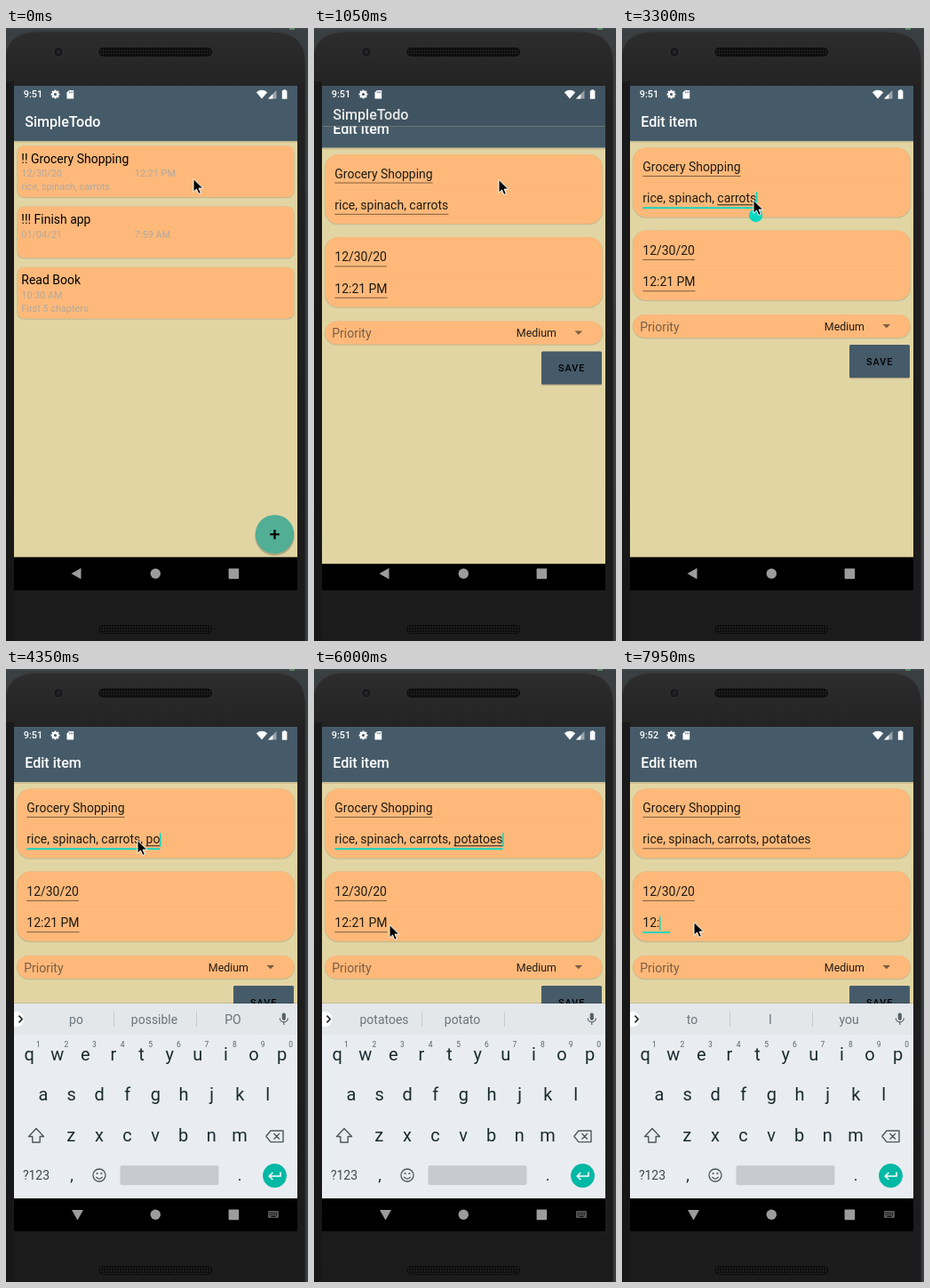
These frames come from a looping animation (340x689 px, 8 s). An HTML page:

```html
<!DOCTYPE html>
<html lang="en">
<head>
<meta charset="utf-8">
<title>Todo app</title>
<style>
  html, body { margin: 0; width: 100%; height: 100%; overflow: hidden; background: #111; }
  svg { display: block; width: 340px; height: 689px; }
  text { font-family: Roboto, sans-serif; white-space: pre; }
</style>
</head>
<body>
<svg id="stage" viewBox="0 0 340 689" xmlns="http://www.w3.org/2000/svg"></svg>
<script>
const LOOP = 8000, TICK = 150;
const SLATE = '#465b69', SAND = '#e2d5a4', PEACH = '#feb97a', TEAL = '#05d8c2';
const BODY = 13.97, SMALL = 10.87;

const pen = document.createElement('canvas').getContext('2d');
pen.font = `${BODY}px Roboto, sans-serif`;
const widthOf = s => pen.measureText(s).width;

// Markup helpers
const text = (s, x, y, size, fill = '#000', more = '') =>
  `<text x="${x}" y="${y}" font-size="${size}" fill="${fill}" ${more}>${s}</text>`;
const rect = (x, y, w, h, fill, r = 0, more = '') =>
  `<rect x="${x}" y="${y}" width="${w}" height="${h}" rx="${r}" fill="${fill}" ${more}/>`;
const path = (d, fill, more = '') => `<path d="${d}" fill="${fill}" ${more}/>`;
const circle = (x, y, r, fill, more = '') => `<circle cx="${x}" cy="${y}" r="${r}" fill="${fill}" ${more}/>`;
const line = (d, color, w = 1, more = '') => path(d, 'none', `stroke="${color}" stroke-width="${w}" ${more}`);
const MID = 'text-anchor="middle"', BOLD = 'font-weight="500"';

const card = (x, y, w, h, r) =>
  rect(x, y + .6, w, h, '#000', r, 'opacity=".12" stroke="#000" stroke-width="1.4"') + rect(x, y, w, h, PEACH, r);

function page(title, content) {
  return rect(9, 65, 319, 529.7, SAND) + content +
    rect(9, 127, 319, 2, '#000', 0, 'opacity=".1"') +
    rect(9, 65, 319, 62, SLATE) + text(title, 21.2, 111.4, 16.1, '#fff', BOLD);
}

function todo(y, title, date, time, note) {
  const gray = '#b1a89f';
  return card(13, y, 311, 57.5, 7) + text(title, 17.3, y + 19.2, BODY) +
    text(date, 17.3, y + 34.9, SMALL, gray) + text(time, 144.8, y + 34.9, SMALL, gray) +
    text(note, 17.3, y + 49.8, SMALL, gray);
}

function listPage() {
  return page('SimpleTodo',
    todo(132.5, '!! Grocery Shopping', '12/30/20', '12:21 PM', 'rice, spinach, carrots') +
    todo(200.7, '!!! Finish app', '01/04/21', '7:59 AM', '') +
    todo(268.9, 'Read Book', '10:30 AM', '', 'First 5 chapters') +
    circle(302.5, 571, 22.2, '#000', 'opacity=".2"') + circle(302.5, 569, 21.8, '#52ae94') +
    line('M297.3 569.2h10.4M302.5 564v10.4', '#000', 2.3));
}

const field = (id, y) =>
  `<g id="${id}"><text x="23.3" y="${y}" font-size="${BODY}" fill="#1f1a14"></text>` +
  rect(23.3, y + 5, 10, 1, '#000') + rect(0, y + 2, 0, 1, '#1f1a14') +
  rect(0, y - 12, 1.5, 15.5, TEAL) +
  `<path fill="${TEAL}" d="M0 0L5.6 3.2A7.6 7.6 0 1 1 -5.6 3.2Z"/></g>`;

function editPage() {
  const rule = y => rect(23, y, 292, 1, '#000', 0, 'opacity=".025"');
  return page('Edit item',
    card(12.5, 134.5, 312, 78, 15) + card(12.5, 227.5, 312, 78.5, 15) + card(12.5, 322, 312, 26, 13) +
    rule(173) + rule(267) +
    field('name', 161) + field('note', 196.3) + field('date', 254.9) + field('time', 290.2) +
    text('Priority', 20.3, 340.7, BODY, '#7a5d43') + text('Medium', 227.8, 339.5, 12.42, '#211a13') +
    path('M293.5 333h8.6l-4.3 4.3z', '#7a5d43') +
    rect(256, 357.2, 68, 37, '#000', 1.5, 'opacity=".22"') + rect(256, 356, 68, 37, SLATE, 1.5) +
    text('SAVE', 275, 378.8, SMALL, '#000', BOLD + ' letter-spacing=".97"'));
}

function phone() {
  return rect(0, 0, 340, 689, '#3a3f42') + rect(0, 0, 340, 1.5, '#40494d') + rect(319, 0, 6, 2, '#5d8a66') +
    path('M-2 700V40Q-2 4 36 4H300Q337.5 4 337.5 40V700Z', 'url(#shell)', 'stroke="#3b3b3b" stroke-width="1.5"') +
    rect(0, 60, 9, 629, '#141414', 0, 'opacity=".6"') +
    circle(59, 27, 5.5, '#1a1a1c', 'stroke="#353535"') + circle(59, 27, 2, '#26262b') +
    [22, 671].map(y => rect(104.5, y, 127.5, 10, '#0b0b0b', 5) + rect(105.5, y + 1, 125.5, 8, 'url(#mesh)', 4)).join('');
}

function statusBar() {
  let teeth = '';
  for (let i = 0; i < 8; i++) teeth += rect(54.4, 69.6, 2.2, 2.4, '#fff', 0, `transform="rotate(${i * 45} 55.5 74.5)"`);
  return text('9:51', 19.8, 78.4, SMALL, '#fff', BOLD + ' id="clock"') +
    teeth + circle(55.5, 74.5, 2.6, 'none', 'stroke="#fff" stroke-width="2"') +
    path('M71 70h5.2v9.5h-7.7v-7z', '#fff') +
    line('M71.3 71.3v2M73 71.3v2M74.7 71.3v2', SLATE, .8) +
    path('M281.8 72.2Q288 67.3 294.2 72.2L288 79.6Z', '#fff') +
    path('M304.5 70v9.5h-9.5z', '#fff', 'opacity=".45"') + path('M300.3 74.2v5.3H295z', '#fff') +
    path('M312.3 69.2h2.6v1.1h1.5v9.4h-5.6v-9.4h1.5z', '#fff');
}

function navBar() {
  const gray = '#9c9c9c';
  return path('M73.5 613.3L84.5 607v12.6z', gray, 'id="back"') +
    circle(168.3, 613.3, 5.7, gray) + rect(250.6, 607.6, 11.6, 11.6, gray, .8) +
    `<g id="ime">${path('M74 608h13l-6.5 11.5z', gray)}` +
    rect(295, 609, 12, 8, '#555', 1) +
    line('M296.5 611.3h9M296.5 613.3h9', '#000', 1, 'stroke-dasharray="1 .9"') +
    line('M298.5 615.4h5', '#000') + '</g>';
}

function keyboard() {
  const ink = '#1b2b32', soft = '#69757b', step = 31.6;
  const row = (keys, x, y) => [...keys].map((k, i) => text(k, x + i * step, y, 20, ink, MID)).join('');
  const digits = [...'1234567890'].map((d, i) => text(d, 36.3 + i * step, 425, 8.5, '#566167', MID)).join('');
  const icon = d => line(d, '#4b575d', 1.4, 'stroke-linejoin="round"');
  return rect(9, 375, 319, 1.5, '#000', 0, 'opacity=".12"') +
    rect(9, 376, 319, 219, '#e9edf1') + rect(9, 376, 319, 35, '#e3e7ea') +
    path('M9 385.5A8.5 8.5 0 1 1 9 401.5Z', '#fff') + line('M14.5 389.7l3.7 3.8-3.7 3.8', '#20292d', 1.7) +
    [79, 167, 255.5].map(x => text('', x, 398.6, BODY, soft, MID + ' class="hint"')).join('') +
    rect(121, 385, 1, 17, '#c5cace') + rect(214, 385, 1, 17, '#c5cace') +
    rect(310.7, 386.5, 4.2, 8.4, '#566167', 2.1) + line('M308.3 392.5a4.5 4.3 0 0 0 9 0M312.8 397v3', '#566167', 1.2) +
    row('qwertyuiop', 26.2, 440) + digits + row('asdfghjkl', 42, 485) + row('zxcvbnm', 73.3, 531) +
    icon('M34 516.5l8.5 9h-4.3v6.5h-8.4v-6.5h-4.3z') +
    icon('M292.8 525.3l5.2-6.3h14v12.6h-14zM301.5 522l6.5 6.6M308 522l-6.5 6.6') +
    text('?123', 34, 574, BODY, '#3c484e', MID) + text(',', 74, 575, 18, ink, MID) + text('.', 263, 575, 18, ink, MID) +
    circle(105, 569, 7, 'none', 'stroke="#4b575d" stroke-width="1.3"') +
    circle(102.6, 567, 1.1, '#4b575d') + circle(107.4, 567, 1.1, '#4b575d') + line('M101.3 570.8q3.7 4.5 7.4 0', '#4b575d', 1.3) +
    rect(128.5, 558, 111, 22, '#c7cbcf', 2) +
    circle(302.5, 569.5, 13.4, '#00b8a4') +
    line('M309 565.5v4.5h-12.5M300.3 566l-4 4 4 4', '#fff', 1.6);
}

const stage = document.getElementById('stage');
stage.innerHTML = `<defs>
  <linearGradient id="shell" x2="0" y2="1"><stop stop-color="#2d2d2d"/><stop offset=".1" stop-color="#222"/><stop offset="1" stop-color="#1b1b1b"/></linearGradient>
  <pattern id="mesh" width="3" height="3" patternUnits="userSpaceOnUse"><circle cx="1.5" cy="1.5" r=".9" fill="#292929"/></pattern>
  <clipPath id="screen"><rect x="9" y="65" width="319" height="567"/></clipPath>
  <clipPath id="reveal"><rect id="window" x="9" y="65" width="319" height="567"/></clipPath>
  </defs>${phone()}
  <g clip-path="url(#screen)">
    ${rect(9, 65, 319, 567, '#000')}
    <g id="list">${listPage()}</g>
    <g id="edit" clip-path="url(#reveal)"><g id="sheet">${editPage()}</g></g>
    <g id="keys">${keyboard()}</g>
    ${statusBar()}${navBar()}
  </g>
  <path id="mouse" d="M0 .5V15.3L3.5 12 5.8 17.4 8.4 16.3 6.1 11.1H10.8Z" fill="#000" stroke="#fff" stroke-width="1"/>`;

const $ = id => document.getElementById(id);
const set = (el, attrs) => { for (const k in attrs) el.setAttribute(k, attrs[k]); };
const show = (el, on) => { el.style.display = on ? '' : 'none'; };
const latest = (list, t) => list.reduce((v, e) => e[0] <= t ? e : v, list[0]);

// [time, x, y] of the pointer tip
const route = [
  [0, 211, 169], [900, 211, 169], [1050, 208, 170], [1200, 206, 171], [1800, 168, 188],
  [2400, 168, 188], [2850, 148, 193], [4200, 148, 193], [4350, 148, 192], [5100, 148, 192],
  [5550, 150, 295], [5700, 150, 295], [5850, 104, 303], [6000, 85, 287], [6300, 81, 284], [LOOP, 81, 284]
];
const noteTyping = [
  [0, 'rice, spinach, ', 'carrots'], [3900, 'rice, spinach, carrots,', ''], [4050, 'rice, spinach, carrots, ', ''],
  ...[[4350, 2], [4500, 4], [4650, 5], [4800, 6], [4950, 8]]
    .map(([t, n]) => [t, 'rice, spinach, carrots, ', 'potatoes'.slice(0, n)])
];
const hints = [
  [4350, 'po', 'possible', 'PO'], [4500, 'pota', 'potato', 'potatoes'], [4650, 'potat', 'potato', 'potatoes'],
  [4800, 'potato', 'potatoes', 'potato’s'], [4950, 'potatoes', 'potato', ''], [6900, 'to', 'I', 'you']
];

function pointer(t) {
  const i = Math.max(1, route.findIndex(p => p[0] >= t));
  const [a, b] = [route[i - 1], route[i]], k = (t - a[0]) / (b[0] - a[0]);
  return [a[1] + (b[1] - a[1]) * k, a[2] + (b[2] - a[2]) * k];
}

function drawField(id, value, { focus = false, composing = '', caret = false, handle = false } = {}) {
  const [label, under, mark, bar, drop] = $(id).children;
  const y = +label.getAttribute('y'), full = value + composing, end = 23.3 + widthOf(full);
  label.textContent = full;
  set(under, {
    y: y + 5, width: Math.max(31, end - 23.3), height: focus ? 1.8 : 1,
    fill: focus ? TEAL : '#000', opacity: focus ? 1 : .5
  });
  set(mark, { x: 23.3 + widthOf(value), width: widthOf(composing) });
  set(bar, { x: end - .4 });
  set(drop, { transform: `translate(${end - .7} ${y + 6})` });
  show(bar, caret);
  show(drop, handle);
}

function draw(t) {
  // Page opening: the new page slides up while its clip uncovers it from below
  const k = (t - 900) / TICK, rest = k < 4 ? .95 * .345 ** k : 0, opened = t >= 900;
  show($('list'), k < 4);
  show($('edit'), opened);
  set($('list'), { transform: `translate(0 ${opened ? -12 * (1 - rest) : 0})`, opacity: opened ? 1 - .12 * (1 - rest) : 1 });
  set($('sheet'), { transform: `translate(0 ${23 * rest})` });
  set($('window'), { y: 65 + 530 * Math.min(1, rest ** 2.2) });

  const inNote = t >= 2850 && t < 6450, inTime = t >= 6450;
  const [, value, part] = latest(noteTyping, t);
  const active = t >= 3150 && t < 6450;
  drawField('name', 'Grocery Shopping');
  drawField('note', active ? value : value + part, {
    focus: inNote, composing: active ? part : '',
    caret: active && !(t >= 5400 && t < 5850), handle: t >= 3150 && t < 3900
  });
  drawField('date', '12/30/20');
  const erased = t < 7350 ? 0 : Math.floor((t - 7350) / TICK) + 1;
  drawField('time', '12:21 PM'.slice(0, 8 - erased), {
    focus: inTime, caret: t >= 6600, handle: t >= 6750 && t < 7350
  });

  show($('back'), t < 3750);
  show($('ime'), t >= 3750);
  show($('keys'), t >= 4350);
  const words = latest(hints, t);
  document.querySelectorAll('.hint').forEach((el, i) => { el.textContent = words[i + 1]; });
  $('clock').textContent = t < 7350 ? '9:51' : '9:52';
  set($('mouse'), { transform: `translate(${pointer(t)})` });
}

const start = performance.now();
function frame(now) {
  const t = Math.max(0, now - start) % LOOP;
  draw(Math.floor(t / TICK) * TICK);
  requestAnimationFrame(frame);
}
draw(0);
requestAnimationFrame(frame);
</script>
</body>
</html>
```
